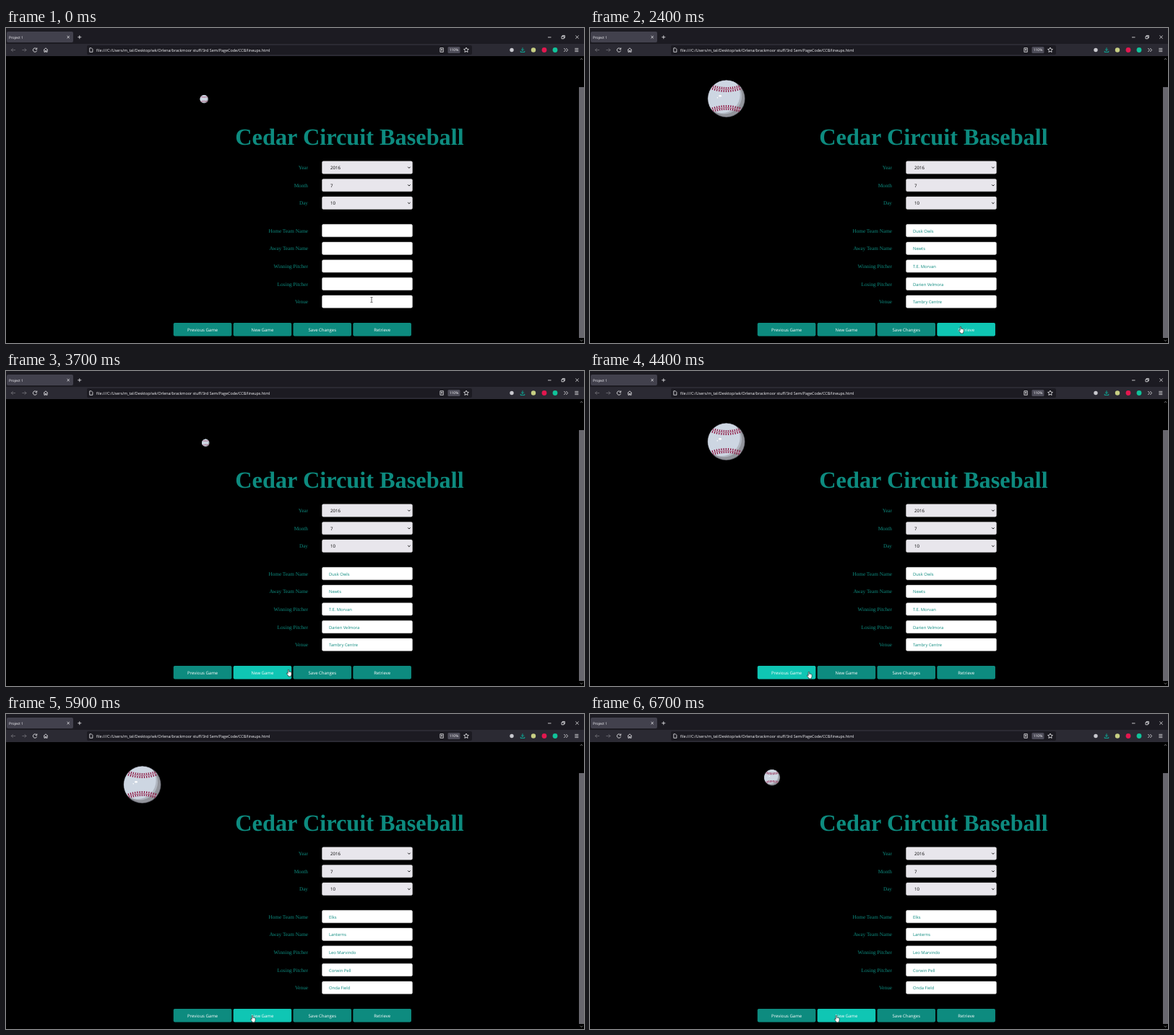
Write an HTML page that moves like this. It is 800 px wide and 437 px high and loops after 6.8 s.

```html
<!DOCTYPE html>
<html lang="en">
<head>
<meta charset="utf-8">
<title>Project 1</title>
<style>
  html, body { margin: 0; width: 100%; height: 100%; overflow: hidden; background: #000; }
  svg { display: block; width: 100vw; height: 100vh; }
  text { font-family: "Open Sans", "Noto Sans", sans-serif; font-size: 6px; text-rendering: geometricPrecision; }
  .serif { font-family: "Liberation Serif", serif; fill: #0d8b7f; }
  .title { font-size: 32.3px; font-weight: bold; text-anchor: middle; }
  .label { font-size: 7.25px; text-anchor: end; }
  .value { font-size: 5.85px; font-weight: 500; fill: #0d8b7f; }
  .pick { font-size: 6.1px; font-weight: 500; }
  .button text { fill: #fff; text-anchor: middle; }
  .button rect { fill: #0d8b7f; }
  .button.hover rect { fill: #0fc6b4; }
  .line { fill: none; stroke: #fbfbfe; stroke-width: .75; }
  .chrome { fill: #fbfbfe; }
</style>
</head>
<body>
<svg viewBox="0 0 800 437" preserveAspectRatio="none">
  <defs>
    <clipPath id="round"><circle r="25.3"/></clipPath>
  </defs>
  <rect width="800" height="437"/>

  <!-- browser frame -->
  <rect width="800" height="21.5" fill="#1c1b22"/>
  <rect x="1" y="5" width="92" height="15" rx="2" fill="#42414d"/>
  <text class="chrome" x="4" y="14.7" style="font-size:4.9px">Project 1</text>
  <path class="line" d="M84.6 11l3.2 3.2m0-3.2l-3.2 3.2M99.3 12.7h5m-2.5-2.5v5M750 12.9h4.5M788.4 10.5l4.2 4.2m0-4.2l-4.2 4.2M769 11.6h3.2v3.2h-3.2zM770.2 11.4v-1h3.2v3.2h-1"/>
  <rect y="21.5" width="800" height="17.5" fill="#2b2a33"/>
  <rect x="112" y="24" width="533" height="13" rx="2" fill="#1c1b22"/>
  <path class="line" stroke-opacity=".35" d="M13 30.5H7.3m2.5-2.5l-2.5 2.5 2.5 2.5M22.3 30.5H28m-2.5-2.5l2.5 2.5-2.5 2.5"/>
  <path class="line" d="M42.3 29a2.7 2.7 0 1 0 .4 2.2M42.8 27.4v2.1h-2.1M52 30.6l3-2.8 3 2.8M52.9 30v3.3h1.4v-1.8h1.4v1.8h1.4V30M115.8 27.8h2.5l1.6 1.6v3.9h-4.1zM600.9 27.7h4.4v5.6h-4.4zM602 29.5h2.2m-2.2 1.5h2.2"/>
  <text class="chrome" x="125" y="32.6" style="font-size:5.4px">file:///C:/Users/m_tal/Desktop/wk/Orlena/brackmoor stuff/3rd Sem/PageCode/CCB/lineups.html</text>
  <rect x="611.5" y="26" width="17" height="9" rx="1.5" fill="#4c4b57"/>
  <text class="chrome" x="620" y="32.3" text-anchor="middle" style="font-size:5px">110%</text>
  <path class="line" d="M637 27l1 2.2 2.4.3-1.8 1.6.5 2.4-2.1-1.2-2.1 1.2.5-2.4-1.8-1.6 2.4-.3z"/>
  <circle cx="700" cy="30.5" r="2.7" fill="#c8c8ce"/>
  <path class="line" style="stroke:#00d5b9" d="M715 27.3v4m-1.8-1.7l1.8 1.8 1.8-1.8M712.2 31.8v1.6h5.6v-1.6"/>
  <circle cx="730" cy="30.5" r="3.2" fill="#c7cf83"/>
  <circle cx="745" cy="30.5" r="3.4" fill="#e3174f"/>
  <circle cx="760" cy="30.5" r="3.4" fill="#11c39a"/>
  <path class="line" d="M772.3 28l2.3 2.5-2.3 2.5m3-5l2.3 2.5-2.3 2.5M787.3 28.4h5m-5 2.1h5m-5 2.1h5"/>

  <!-- scrollbar -->
  <rect x="793" y="82" width="7" height="348" fill="#68676e"/>
  <path class="line" stroke-opacity=".6" d="M794.8 44l1.7-1.8 1.7 1.8M794.8 432.6l1.7 1.8 1.7-1.8"/>

  <text class="serif title" x="475.5" y="162.3">Cedar Circuit Baseball</text>
  <g id="form"></g>

  <g id="ball">
    <circle r="26" fill="#4c4d55"/>
    <g clip-path="url(#round)">
      <circle r="26" fill="#92949b"/>
      <circle cx="-3.5" cy="-3.5" r="25" fill="#b0b6c0"/>
      <circle cx="-6.5" cy="-5.5" r="25.5" fill="#cdd6e2"/>
      <g id="seams" fill="none"></g>
    </g>
    <ellipse cx="-8.6" cy="-3.7" rx="2" ry="1.3" fill="#fff"/>
    <circle cx="-12.3" cy="-1.2" r=".8" fill="#fff"/>
  </g>

  <path id="beam" d="M-1.5-3.5h1.1l.4.5.4-.5h1.1M0-3v6M-1.5 3.5h1.1l.4-.5.4.5h1.1" fill="none" stroke="#222" stroke-width=".7"/>
  <path id="hand" d="M-1.8-4.4q.8-.9 1.5 0v2.8q.7-.5 1.2.1.7-.4 1.2.2.8-.2 1 .6v2.4q0 1.2-.7 2v1.1h-3.6v-.9l-2.3-3q-.2-1.2.8-.9l.9.8z" fill="#fff" stroke="#111" stroke-width=".6"/>
</svg>

<script>
const LOOP = 6800, STEP = 100;
const $ = id => document.getElementById(id);

function add(parent, tag, attrs, text) {
  const el = document.createElementNS('http://www.w3.org/2000/svg', tag);
  for (const k in attrs) el.setAttribute(k, attrs[k]);
  if (text) el.textContent = text;
  return parent.appendChild(el);
}

// form
const form = $('form');
const rowY = i => 193.5 + i * 24.65 + (i > 2 ? 13.6 : 0);
const choices = ['2016', '7', '10'];
const labels = ['Year', 'Month', 'Day', 'Home Team Name', 'Away Team Name',
  'Winning Pitcher', 'Losing Pitcher', 'Venue'];
const values = [];

labels.forEach((label, i) => {
  const y = rowY(i), pick = choices[i];
  add(form, 'text', { class: 'serif label', x: 418, y: y + 2.6 }, label);
  add(form, 'rect', { x: 437.5, y: y - 8.7, width: 125, height: 17.4, rx: 1.8,
    fill: pick ? '#e8e6ec' : '#fff', stroke: '#ccc', 'stroke-width': .46 });
  if (pick) {
    add(form, 'text', { class: 'pick', x: 449, y: y + 2.5 }, pick);
    add(form, 'path', { d: `M556.2 ${y - .8}l1.7 1.7 1.7-1.7`, fill: 'none', stroke: '#111' });
  } else {
    values.push(add(form, 'text', { class: 'value', x: 447, y: y + 2.6 }));
  }
});

const buttons = ['Previous Game', 'New Game', 'Save Changes', 'Retrieve'].map((name, i) => {
  const x = 231.8 + i * 82.85;
  const el = add(form, 'g', { class: 'button' });
  add(el, 'rect', { x, y: 409, width: 80.6, height: 18.4, rx: 1.8 });
  add(el, 'text', { x: x + 40.3, y: 420.6 }, name);
  return { el, x };
});

// stitched seams
for (const side of [-1, 1]) {
  const d = `M-25 ${side * 18}Q0 ${side * 7} 25 ${side * 18}`;
  add($('seams'), 'path', { d, stroke: '#8c1440', 'stroke-width': 7, 'stroke-dasharray': '1.3 1.8' });
  add($('seams'), 'path', { d, stroke: '#cdd6e2', 'stroke-width': 1.4 });
  add($('seams'), 'path', { d, stroke: '#a03a5c', 'stroke-width': .7 });
}

// time rules
const blank = ['', '', '', '', ''];
const games = [
  [0, blank],
  [2000, ['Dusk Owls', 'Newts', 'T.E. Morvan', 'Darien Velmora', 'Tambry Centre']],
  [5500, ['Elks', 'Lanterns', 'Leo Marvindo', 'Corwin Pell', 'Onda Field']]
];
const pointer = [
  [0, 506, 377], [600, 516, 418], [1000, 514, 419], [2400, 514, 419], [3000, 492, 418],
  [3100, 449, 417], [3400, 430, 417], [3700, 392, 419], [4100, 304, 422],
  [4400, 304, 422], [4900, 342, 423], [LOOP, 342, 423]
];
const mix = (a, b, u) => a + (b - a) * u;
const clamp = u => Math.min(1, Math.max(0, u));

function pointerAt(t) {
  const i = pointer.findIndex(k => k[0] > t);
  const [t0, x0, y0] = pointer[i - 1], [t1, x1, y1] = pointer[i];
  const u = (t - t0) / (t1 - t0);
  return [mix(x0, x1, u), mix(y0, y1, u)];
}

// cubic-bezier(.5, 0, .3, 1)
function ease(u) {
  let lo = 0, hi = 1;
  for (let i = 0; i < 24; i++) {
    const s = (lo + hi) / 2, r = 1 - s;
    if (1.5 * r * r * s + .9 * r * s * s + s ** 3 < u) lo = s; else hi = s;
  }
  return lo * lo * (3 - 2 * lo);
}

// the throw restarts twice per loop: rest, fly off, stay small
function ballAt(t) {
  const phase = t < 740 ? t + 2820 : t < 4300 ? t - 740 : t - 4300;
  const p = ease(clamp((phase - 1610) / 1500));
  const y = p < .62 ? mix(98, 84, p / .62) : mix(84, 100, (p - .62) / .38);
  return [mix(188.6, 277, p), y, mix(1, .2, p)];
}

function draw(t) {
  const [bx, by, size] = ballAt(t);
  $('ball').setAttribute('transform', `translate(${bx} ${by}) scale(${size})`);

  const [x, y] = pointerAt(t), low = y > 409;
  for (const b of buttons)
    b.el.classList.toggle('hover', low && x >= b.x && x <= b.x + 80.6);
  for (const [id, on] of [['hand', low], ['beam', !low]]) {
    $(id).setAttribute('transform', `translate(${x} ${y})`);
    $(id).style.display = on ? '' : 'none';
  }

  const game = games.filter(g => g[0] <= t).pop()[1];
  values.forEach((el, i) => { el.textContent = game[i]; });
}

const start = performance.now();
function tick() {
  const t = (performance.now() - start) % LOOP;
  draw(Math.floor(t / STEP) * STEP);
  requestAnimationFrame(tick);
}
tick();
</script>
</body>
</html>
```
